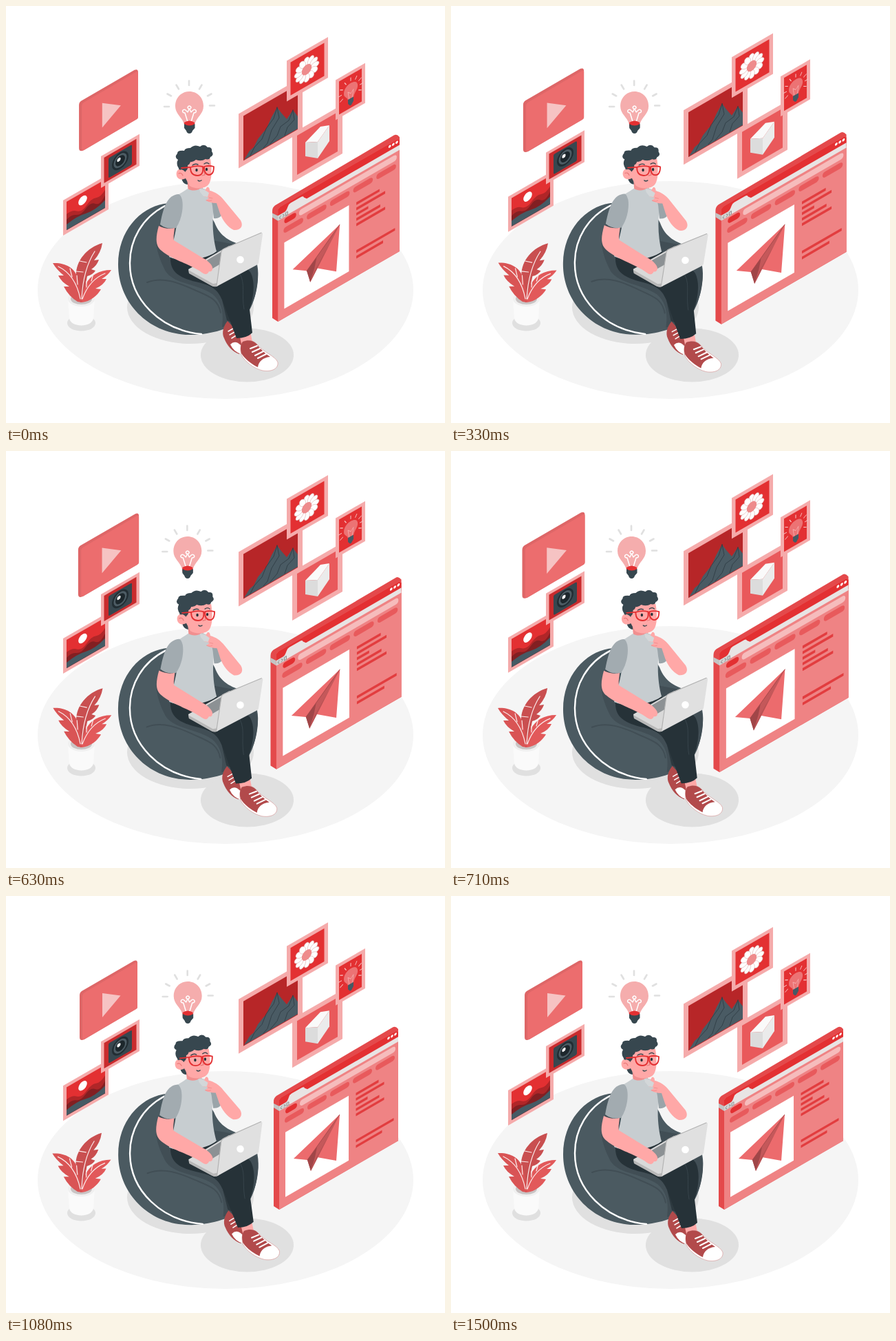
Write an HTML page that moves like this. It is 638 by 605 pixels and loops after 1.54 s.

```html
<!DOCTYPE html>
<html lang="en">
<head>
<meta charset="utf-8">
<title>Thinking it over</title>
<style>
html, body { margin: 0; width: 100%; height: 100%; overflow: hidden; background: #fff; }
svg { display: block; width: 100%; height: 100%; }
.line { fill: none; stroke-linecap: round; stroke-linejoin: round; }
</style>
</head>
<body>
<svg viewBox="0 0 638 605" xmlns="http://www.w3.org/2000/svg">
  <ellipse cx="319" cy="412" rx="273" ry="158" fill="#f5f5f5"/>
  <g fill="#e0e0e0">
    <ellipse cx="268" cy="437" rx="92" ry="53"/>
    <ellipse cx="350.5" cy="506.5" rx="67.5" ry="39"/>
    <ellipse cx="109.5" cy="460" rx="20.5" ry="11.5"/>
  </g>

  <!-- plant -->
  <path d="M90 425L92 453C94 467 125 467 127 453L129 425Z" fill="#fafafa"/>
  <ellipse cx="109.5" cy="425" rx="19.5" ry="11" fill="#f0f0f0"/>
  <ellipse cx="109.5" cy="425" rx="15.5" ry="8" fill="#c9c4c4"/>
  <g id="leaves">
    <path d="M140 344C118 350 101 370 102 391C103 406 106 420 108 430L113 429C114 415 116 402 118 392Q126 390 130 384L124 382Q132 377 135 368L128 369Q138 358 140 344Z" fill="#c94f50"/>
    <path d="M68 373C86 372 100 380 104 394C108 408 110 420 110 430L104 429Q91 421 84 407L92 407Q80 400 76 391L84 391Q73 382 68 373Z" fill="#d95455"/>
    <path d="M153 383C135 383 122 391 116 404C112 414 109 424 110 430C122 429 133 420 138 411L130 410Q142 405 146 396L139 396Q148 391 153 383Z" fill="#e2595a"/>
    <g class="line" stroke="#fbeaea" stroke-width="1.200">
      <path d="M129 356Q112 382 110 425M76 378Q101 390 108 425M144 388Q121 397 111 425"/>
      <path d="M117 372L107 370M112 386L102 385M96 393L93 381M104 404L103 391M124 399L127 388M117 408L117 399"/>
    </g>
  </g>

  <g id="video">
    <path d="M107 144Q107 140 110 138L186 94Q191 92 191 97V161Q191 163 189 164L114 208Q107 211 107 205Z" fill="#de6667"/>
    <path d="M111 145Q111 142 114 140L188 97Q191 95.500 191 98V161Q191 163 189 164L114 207.500Q111 209 111 205Z" fill="#ec6d6e"/>
    <path d="M140 141L166.500 144.500L140 176Z" fill="#f6c3c3"/>
  </g>

  <g id="cards"></g>
  <g id="window">
    <path d="M389 298Q389 293 393 290L562 190.500Q566 188 570 193V355L397 455L389 450Z" fill="#e4494b"/>
    <path d="M389 301L397 305V312L389 307Z" fill="#c4c4c4"/>
    <g id="face" transform="matrix(1 -.577 0 1 397 294)">
      <path d="M0 161V2L3 0H170L173 3V161Z" fill="#ef8384"/>
      <path d="M0 15V2L3 0H170L173 3V15Z" fill="#e33032"/>
      <path d="M0 11H9Q12 11 14 6Q15 3 18 3H33Q36 3 37 6L41 10H173V17H0Z" fill="#e8e4e4"/>
      <path d="M0 11H14V18H0Z" fill="#d3d3d3"/>
      <path class="line" d="M4 13L2 15L4 17M7 13L9 15L7 17M11 13H14V17H11Z" stroke="#8b8b8b" stroke-width=".8"/>
      <rect x="30" y="20.500" width="139" height="8.500" rx="4" fill="#f6bcbc"/>
      <rect x="9" y="20" width="17" height="8" rx="4" fill="#e33032"/>
      <rect x="9" y="54" width="92" height="94" fill="#fff"/>
    </g>
    <path d="M485 317L418 381L438 383L452 379L480 384Z" fill="#ec6b6d"/>
    <path d="M485 317L438 383L443 399Z" fill="#c4585a"/>
    <path d="M438 383L452 364L449 379L443 399Z" fill="#a04648"/>
    <path d="M443 399L451 379L470 346Z" fill="#b95153"/>
    <path d="M485 317L438 383" stroke="#a04648" stroke-width=".8"/>
  </g>

  <g id="bulb">
    <path class="line" d="M266 108.500V115M247.500 114.500L251 120.500M284.500 114.500L281 120.500M234.500 127.500L240 130.500M298.500 127.500L293 130.500M230 146H237M296 144.500H303" stroke="#e0e0e0" stroke-width="2.600"/>
    <path d="M266.500 124C278 124 287 133 287 145C287 157 277 161 274.500 171H258.500C256 161 246 157 246 145C246 133 255 124 266.500 124Z" fill="#f5adad"/>
    <path class="line" d="M264 168L260 155C254 155 257 148 261 151L264 154L266.500 149M269 168L273 155C279 155 276 148 272 151L269 154L266.500 149M264 147Q266.500 143 269 147Q269 149 266.500 150Q264 149 264 147" stroke="#fff" stroke-width="1.500"/>
    <path d="M259 169Q266.500 164 274 169V175H259Z" fill="#e33032"/>
    <path d="M259 171Q266.500 176 274.500 171V177L271 181Q270 185 266.500 185Q263 185 262 181L259 177Z" fill="#37474f"/>
  </g>

  <g id="person">
    <path d="M163 375C163 326 195 293 229 287C262 282 292 292 303 314C311 335 326 342 347 348C362 358 368 375 366 395C363 424 357 444 340 457C322 470 293 477 268 477C207 477 163 430 163 375Z" fill="#4b5a61"/>
    <path d="M226 316C214 330 216 355 232 385C245 404 275 402 300 418C318 433 315 455 314 466Q330 462 340 455C354 443 364 425 366 397C367 375 358 356 345 348L300 340Z" fill="#414e55"/>
    <path class="line" d="M205 401C228 392 252 402 272 411C294 421 308 424 312 445" stroke="#414e55" stroke-width="2"/>
    <path class="line" d="M231 290C198 307 180 339 180 373C180 426 224 470 284 476" stroke="#fff" stroke-width="2.400"/>

    <!-- legs and shoes -->
    <path d="M322 457C316 464 313 474 317 482C321 492 329 502 339 505L346 492L336 472Z" fill="#b24a4b"/>
    <path d="M326 491Q333 484 341 492L342 505Q331 502 326 491Z" fill="#fff"/>
    <path class="line" d="M323 472L330 468M325 477L332 473M328 482L336 477" stroke="#fff" stroke-width="1.500"/>
    <path d="M301 400L314 426L321 456L335 462L340 430Z" fill="#2d393f"/>
    <path d="M339 476L342 490Q350 494 358 487L355 472Z" fill="#ffa8a7"/>
    <path d="M239 363C238 384 248 394 280 401C300 406 308 412 314 426L335 482Q350 482 358 474L354 440C361 420 362 398 355 386C345 374 322 364 305 356Z" fill="#263238"/>
    <path class="line" d="M340 389C348 402 342 419 346 440" stroke="#37444b" stroke-width="1"/>
    <path d="M344 487C352 484 359 485 364 490C373 502 392 508 395 517C396 527 385 531 373 529C360 526 347 516 342 506C340 498 341 492 344 487Z" fill="#fff" stroke="#d99c9c" stroke-width=".7"/>
    <path d="M344 487C352 484 359 485 364 490C369 497 376 504 384 509C373 510 367 516 366 524C356 519 347 512 342 504C340 497 341 491 344 487Z" fill="#b24a4b"/>
    <path class="line" d="M355 497L365 493M358 502L369 497M362 507L374 501M366 511L378 505" stroke="#fff" stroke-width="2"/>

    <!-- head -->
    <path d="M263 250L265 270Q276 278 287 269L283 250Z" fill="#f18f8f"/>
    <path d="M251 236L262 236L264 259Q256 258 255 249Z" fill="#37474f"/>
    <path d="M262 226Q280 217 297 222C299 234 300 250 295 258C290 266 274 266 267 261L261 250C252 255 246 248 248 241C250 235 257 236 261 241Z" fill="#ffa8a7"/>
    <path d="M253 238Q246 230 250 223Q244 220 249 214Q249 209 259 210Q260 206 268 206Q274 200 282 204Q288 199 293 205Q300 204 299 211Q303 216 297 219Q296 224 290 222Q284 226 276 223Q272 227 268 226Q267 230 264 231Q265 238 260 240Q257 235 253 238Z" fill="#37474f"/>
    <path class="line" d="M271 231Q275 228 279 230M288 229Q292 226 295 229M279 253Q281 255 284 253" stroke="#37474f" stroke-width="1.400"/>
    <path class="line" d="M287 237L289 245L285 246M251 243Q255 241 257 246" stroke="#e87878" stroke-width="1.200"/>
    <ellipse cx="277" cy="238" rx="1.700" ry="2.200" fill="#263238"/>
    <ellipse cx="291.500" cy="237" rx="1.700" ry="2.200" fill="#263238"/>
    <path class="line" d="M255 235L267 234M268 234Q276 231 286 233C287 241 285 246 278 246C270 246 268 241 268 234ZM288 233Q295 231 302 233C302 241 300 245 295 245C290 245 288 240 288 233ZM286 235H288" stroke="#e33032" stroke-width="1.800"/>

    <!-- torso -->
    <path d="M250 274C255 271 260 268 264 265C270 269 279 268 284 264L297 268C303 273 304 281 302 291C299 315 301 338 306 356C294 366 259 374 237 364C242 346 253 312 250 274Z" fill="#c7cdd0"/>
    <path d="M296 270C306 277 311 289 314 303Q310 309 302 308L300 290Z" fill="#9aa4a9"/>
    <path d="M251 273C236 274 229 288 224 317Q234 325 247 322C256 309 258 291 256 281Q254 274 251 273Z" fill="#a2abb0"/>
    <path d="M292 263C295 262 296 265 296 268C303 269 312 275 317 282L341 311C346 320 340 326 331 325C322 321 315 311 311 301L306 286Q296 286 291 282L295 278L287 276Q291 272 289 268Z" fill="#ffa8a7"/>
    <path d="M281 265L289 267L295 271L293 277L287 276L282 270Z" fill="#d3d7d9"/>
    <path class="line" d="M291 282Q295 284 299 282M295 278L300 279" stroke="#f18f8f" stroke-width="1"/>

    <!-- laptop -->
    <path d="M265 382L324 348Q330 347 335 351L315 361L308 406Q304 408 299 406L267 388Z" fill="#d9d9d9"/>
    <path d="M265 383L301 403L307 402L306 407Q302 408 299 406L266 388Z" fill="#b8b8b8"/>
    <path d="M285 373L321 352L331 354L314 363L312 374L300 381Z" fill="#8c9194"/>
    <path d="M313 356Q314 353 317 352L370 329Q373 328 373 331L367 373Q366 375 364 376L306 407Z" fill="#e0e0e0"/>
    <path class="line" d="M306 406L313 356Q314 353 317 352L371 329" stroke="#b3b3b3" stroke-width="1.200"/>
    <circle cx="340.500" cy="368" r="5.300" fill="#fff"/>
    <path d="M222 319Q234 325 245 322C244 331 243 336 244 340L285 365C292 368 302 377 300 382Q299 386 295 385Q292 392 285 387C269 375 241 368 226 355C217 348 217 337 222 319Z" fill="#ffa8a7"/>
  </g>
</svg>

<script>
const LOOP = 1540, CYCLE = 1500, STEP = 1000 / 24;
const $ = id => document.getElementById(id);
const rect = (x, y, w, h, fill, rx = 0) =>
  `<rect x="${x}" y="${y}" width="${w}" height="${h}" rx="${rx}" fill="${fill}"/>`;
const disc = (x, y, r, fill) => `<circle cx="${x}" cy="${y}" r="${r}" fill="${fill}"/>`;
const shape = (d, fill) => `<path d="${d}" fill="${fill}"/>`;
const ring = (n, draw) =>
  Array.from({ length: n }, (_, i) => draw(i * 360 / n)).join('');

// Isometric picture frame; art is drawn in the slanted plane.
const card = (x, y, w, h, pad, fill, art = '') =>
  `<g transform="matrix(1 -.577 0 1 ${x} ${y})">` + rect(0, 0, w, h, '#f5abab') +
  rect(pad, pad, w - 2 * pad, h - 2 * pad, fill) + art + '</g>';

const landscape = disc(28.5, 16.4, 6.3, '#fff') +
  shape('M5 23Q13 21 20 27T34 27T48 24T61 20V46H5Z', '#b02628') +
  shape('M5 31Q12 27 19 32T33 31T47 32T61 28V46H5Z', '#821f22') +
  shape('M5 38Q20 34 33 38T61 35V46H5Z', '#455a64');

const lens = rect(11, 9, 34, 29, '#37474f', 2) + disc(28, 22.5, 12, '#222d33') +
  disc(28, 22.5, 9.5, '#4d5c64') + disc(28, 22.5, 7, '#1d272c') + disc(26, 20, 2.6, '#fff');

const flower = ring(12, a =>
  `<ellipse cx="29" cy="17.500" rx="4.200" ry="6" fill="#fff" stroke="#d9a5a5" stroke-width=".5" transform="rotate(${a} 29 29.5)"/>`) +
  disc(29, 29.5, 7.2, '#ee8b8c');

const mountains = shape('M346 223L354 210L360 205L366 193L374 183L378 179L386 161L394 147L400 155L408 164L417 151L424 160V178Z', '#4a5b64') +
  '<path class="line" d="M394 147L389 163L378 178L372 193L361 205L355 217M394 147L397 162L386 180L380 199L374 206M417 151L411 166L399 175L394 188L384 200M417 151L419 165L409 176L405 188" stroke="#303e46" stroke-width=".9"/>';

const cube = shape('M435 198L457 175L470 173L453 197Z', '#fafafa') +
  shape('M435 198L453 197V221L435 218Z', '#dcdcdc') + shape('M453 197L470 173V196L453 221Z', '#ebebeb');

const lamp = `<g stroke="#f8caca" stroke-width="1">` + ring(12, a => a > 140 && a < 220 ? '' :
  `<path d="M22 14V9" transform="rotate(${a} 22 27)"/>`) + '</g>' +
  shape('M22 17C29 17 33 22 32 28C31 33 27 34 26 40H18C17 34 12 33 12 27C12 21 16 17 22 17Z', '#ec7374') +
  '<path class="line" d="M20 40L18 28L22 32L26 28L24 40" stroke="#f5abab" stroke-width=".8"/>' +
  shape('M18 39H26V45L23 49H21L18 45Z', '#455a64');

$('cards').innerHTML =
  card(83, 282, 66, 51, 5, '#e33032', landscape) +
  card(138, 218, 56, 46, 4.5, '#c92b2d', lens) +
  card(416, 185, 73, 71, 7, '#e9595b') + cube +
  card(338, 156.5, 93, 79, 7, '#b72628') + mountains +
  card(408, 79.5, 60, 59, 5.5, '#e33032', flower) +
  card(479, 107.5, 43, 58, 5, '#e33032', lamp);

// Page furniture: window dots, menu pills, paragraphs.
const copy = [[58, 33], [65.5, 41], [73, 17], [80.5, 34], [88, 41], [126, 55], [134, 38]];
$('face').innerHTML +=
  [159, 164, 169].map(x => disc(x, 4, 1.8, '#fff')).join('') +
  [8, 41, 74, 107, 140].map(x => rect(x, 33, 28, 8, '#e85a5c', 4)).join('') +
  copy.map(([y, w]) => rect(111.5, y - 2, w, 3.8, '#e23d3f')).join('');

const track = (keys, t) => {
  const i = Math.max(1, keys.findIndex(k => k[0] >= t));
  const [a, x] = keys[i - 1], [b, y] = keys[i];
  return x + (y - x) * (t - a) / (b - a);
};
const lift = [[0, 0], [750, -12], [1500, 0]];
const beat = [[0, 1.022], [210, 1.1], [460, 1], [500, 1], [750, 1.1], [1000, 1], [1500, 1]];
const drift = [[0, 0], [170, .3], [400, .1], [500, -.7], [710, -4], [760, -4.1], [1500, 0]];

const place = (id, value) => $(id).setAttribute('transform', value);
const scaleAt = (s, x, y) => `translate(${x} ${y}) scale(${s}) translate(${-x} ${-y})`;

function pose(t) {
  const swing = Math.sin(2 * Math.PI * t / CYCLE);
  const s = track(beat, t);
  place('cards', `translate(0 ${track(lift, t)})`);
  place('bulb', `translate(${track(drift, t)} 0)`);
  place('video', scaleAt(s, 149, 151));
  place('window', scaleAt(s, 479.5, 322.5));
  place('person', `rotate(${.95 * swing} 279.5 366)`);
  place('leaves', `rotate(${.7 * swing} 110 428)`);
}

const start = performance.now();
function tick() {
  const t = (performance.now() - start) % LOOP;
  pose(Math.min(CYCLE, Math.floor((t + 6) / STEP) * STEP));
  requestAnimationFrame(tick);
}
tick();
</script>
</body>
</html>
```
